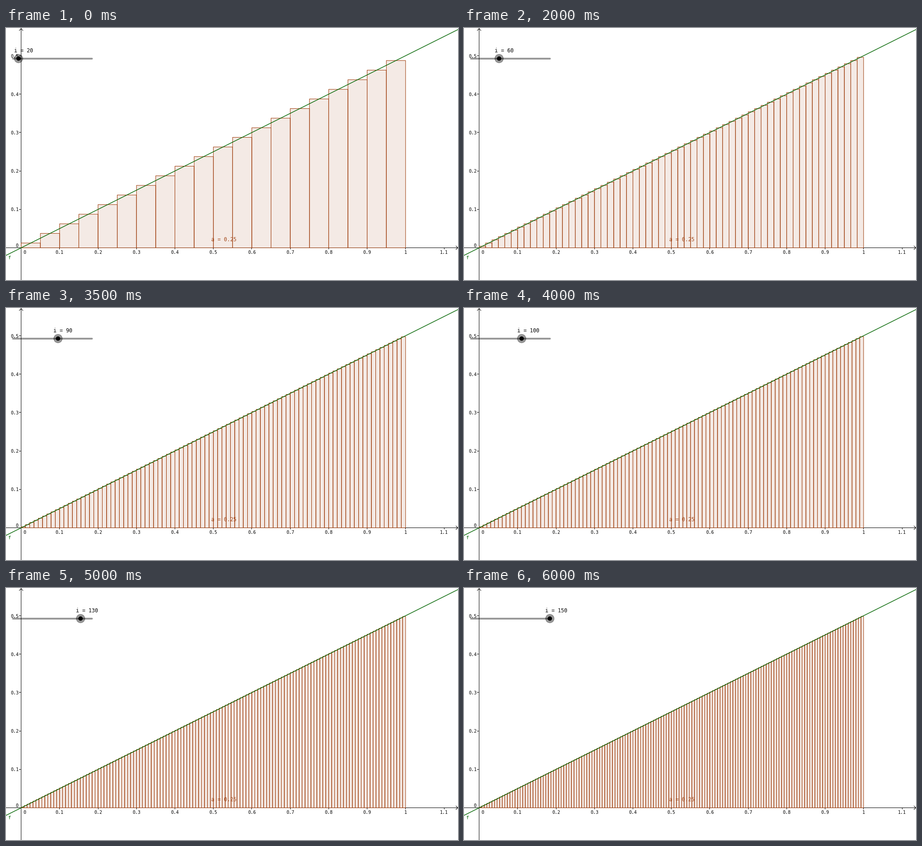
A matplotlib script for the animation above (6.5 s loop, 1002x559 px).

```python
import matplotlib.pyplot as plt
import numpy as np
from matplotlib.animation import FuncAnimation
from matplotlib.collections import PolyCollection
from matplotlib.patches import Circle

W, H, DPI = 1002, 559, 64
PX = 72 / DPI                      # one pixel in points
X0, Y0, UNIT = 33.6, 487.6, 852.2  # origin and pixels per unit
BROWN = (0.6, 0.2, 0)
GREEN = "#006400"
COUNTS = [*range(20, 101, 10), 120, 130, 140, 150]

fig = plt.figure(figsize=(W / DPI, H / DPI), dpi=DPI, facecolor="white")
ax = fig.add_axes([0, 0, 1, 1])
ax.set_xlim(0, W)
ax.set_ylim(H, 0)
ax.axis("off")


def line(xs, ys, color="black", width=1, **kw):
    return ax.plot(xs, ys, color=color, lw=width * PX, **kw)[0]


def crisp(xs, ys):
    """Black hairline centred on the pixels that hold its points."""
    line(np.floor(xs) + 0.5, np.floor(ys) + 0.5, zorder=1, snap=False)


def label(x, y, text, size=10, color="black", ha="center", **kw):
    return ax.text(x, y, text, fontsize=size * PX, color=color, ha=ha,
                   va="center_baseline", family="DejaVu Sans Mono", **kw)


def draw_axes():
    crisp([0, W], [Y0, Y0])
    crisp([X0, X0], [0, H])
    crisp([997, 1001, 997], [Y0 - 4, Y0, Y0 + 4])
    crisp([X0 - 4, X0, X0 + 4], [5, 1, 5])
    for k in range(1, 12):
        x = X0 + k * UNIT / 10
        crisp([x, x], [Y0, Y0 + 3])
        label(x, 497, f"{k / 10:g}", zorder=1)
    for k in range(1, 6):
        y = Y0 - k * UNIT / 10
        crisp([X0 - 4, X0], [y, y])
        label(28, y, f"{k / 10:g}", ha="right", zorder=1)
    label(41, 497, "0", zorder=1)
    label(24.5, 481.5, "0", zorder=1)


def bars(n):
    """Midpoint rectangles under y = x / 2 on [0, 1]."""
    left = np.arange(n) / n
    x1 = X0 + UNIT * left
    x2 = x1 + UNIT / n
    top = Y0 - UNIT * (left + 0.5 / n) / 2
    base = np.full(n, Y0)
    return np.stack([np.c_[x1, base], np.c_[x1, top],
                     np.c_[x2, top], np.c_[x2, base]], axis=1)


draw_axes()
rects = PolyCollection([], facecolors=[(*BROWN, 0.1)], edgecolors=[BROWN],
                       linewidths=PX, zorder=2, snap=False)
ax.add_collection(rects, autolim=False)
line([0, W], [Y0 + X0 / 2, Y0 - (W - X0) / 2], GREEN, 1.4, zorder=3)
label(7.5, 509, "f", color=GREEN)
label(455, 468, "a = 0.25", 11.65, (*BROWN, 0.9), "left", zorder=4)

line([15.5, 190.5], [68, 68], (0, 0, 0, 0.4), 4, solid_capstyle="round",
     snap=False, zorder=5)
ring = Circle((0, 0), 9.5, fc=(0, 0, 0, 0.4), ec=(0, 0, 0, 0.35), lw=PX, zorder=6)
knob = Circle((0, 0), 4.8, fc="black", ec="none", zorder=7)
ax.add_patch(ring)
ax.add_patch(knob)
caption = label(0, 49.5, "", 11.65, ha="left", zorder=7)


def update(frame):
    n = COUNTS[frame]
    x = 15.3 + (n - 10) * 1.25
    rects.set_verts(bars(n))
    ring.center = knob.center = (x, 67.8)
    caption.set_x(x - 10)
    caption.set_text(f"i = {n}")
    return rects, ring, knob, caption


anim = FuncAnimation(fig, update, frames=len(COUNTS), interval=500,
                     repeat=True, repeat_delay=0, blit=False)
plt.show()
```
